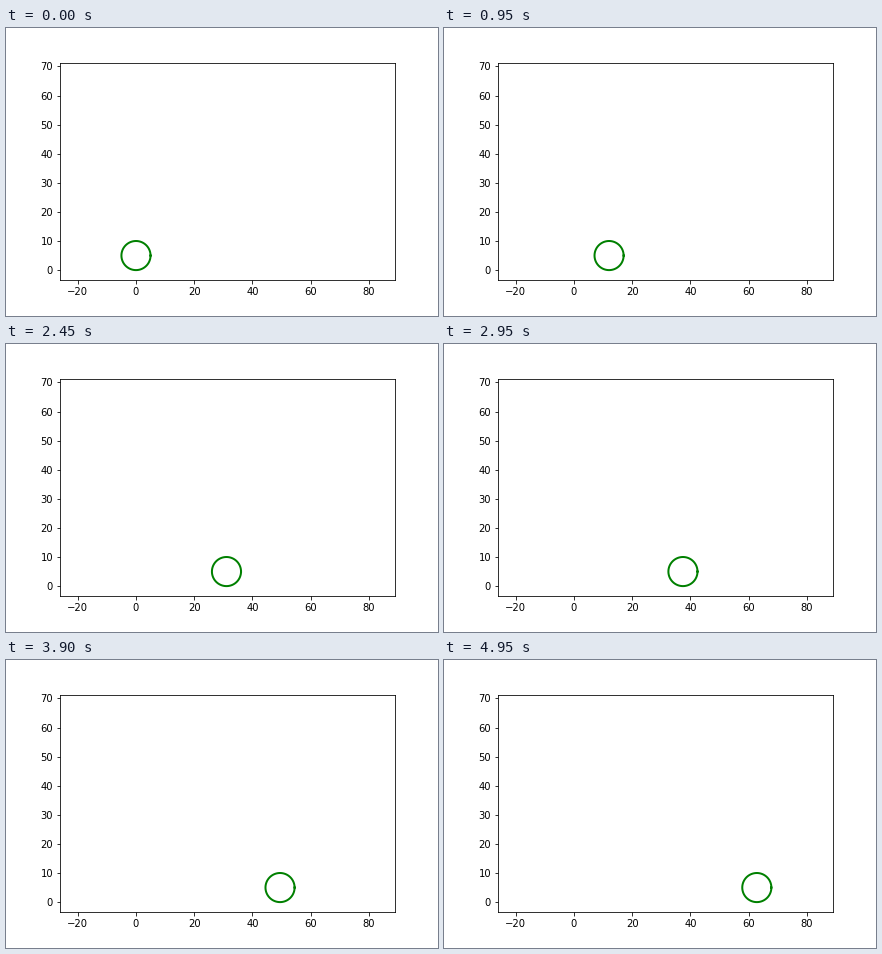
Recreate the animation shown at these times as a matplotlib script. Size 432 px wide and 288 px high, loop 5 s.

```python
import numpy as np
import matplotlib.pyplot as plt
from matplotlib.animation import FuncAnimation

FRAMES = 100
RADIUS = 5
SCALE = 2.91  # pixels per data unit, the same on both axes

fig = plt.figure(figsize=(6, 4), dpi=72, facecolor="white")
fig.subplots_adjust(left=0.125, right=0.9, bottom=0.125, top=0.88)
ax = fig.add_subplot()

# Equal scaling, centred on the distance rolled
width, height = 0.775 * 432 / SCALE, 0.755 * 288 / SCALE
x_mid, y_min = 10 * np.pi, -3.4
ax.set_xlim(x_mid - width / 2, x_mid + width / 2)
ax.set_ylim(y_min, y_min + height)
ax.set_xticks(range(-20, 81, 20))
ax.set_yticks(range(0, 71, 10))

angle = np.linspace(0, 2 * np.pi, 100)
circle_x = RADIUS * np.cos(angle)
circle_y = RADIUS + RADIUS * np.sin(angle)
centres = RADIUS * np.linspace(0, 4 * np.pi, FRAMES)

circle, = ax.plot(circle_x, circle_y, color="green", lw=2)


def update(i):
    circle.set_data(centres[i] + circle_x, circle_y)
    return circle,


anim = FuncAnimation(fig, update, frames=FRAMES, interval=50, repeat=True)
plt.show()
```
